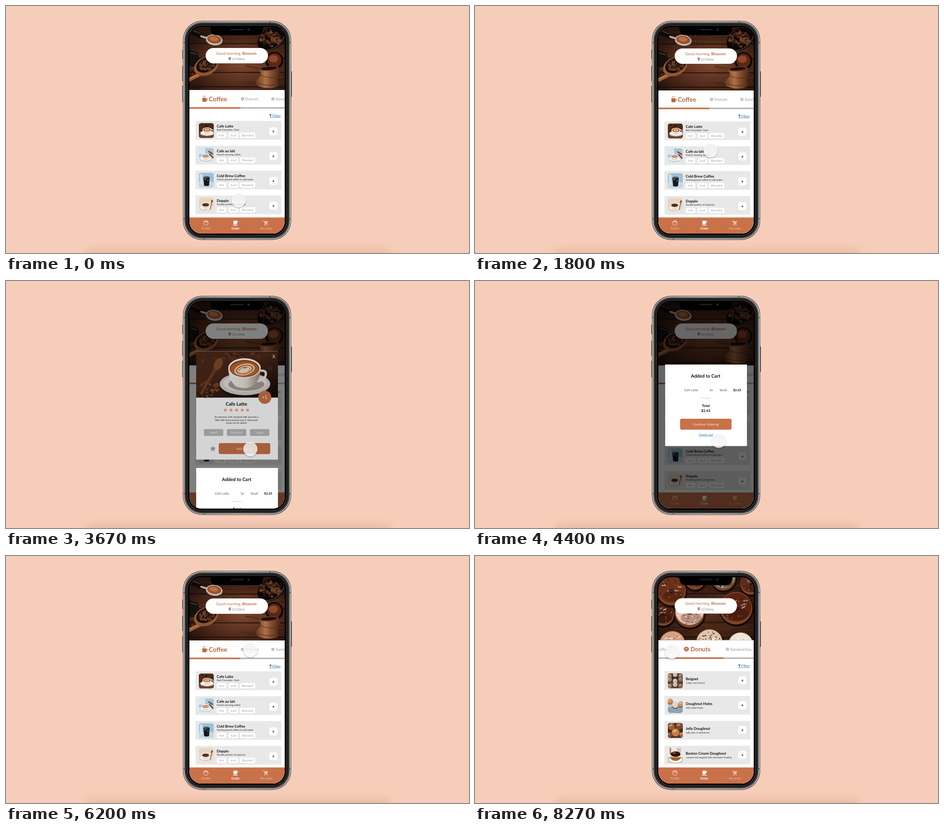
An HTML page for the animation above (8340 ms loop, 1025 px wide and 547 px high).

```html
<!DOCTYPE html>
<html lang="en">
<head>
<meta charset="utf-8">
<title>Coffee ordering app</title>
<style>
  html, body { margin: 0; width: 100%; height: 100%; overflow: hidden; background: #f6cdb8; }
  svg { display: block; width: 100vw; height: 100vh; }
  text { font-family: Lato, "Open Sans", sans-serif; text-rendering: geometricPrecision; }
</style>
</head>
<body>
<svg id="stage" viewBox="0 0 1025 547" xmlns="http://www.w3.org/2000/svg"></svg>
<script>
const LOOP = 8340;
const ORANGE = '#c97149', RUST = '#b9683f', BLUE = '#2b6ca3', GREY = '#b4b4b4';

// Drawing helpers
const rect = (x, y, w, h, fill, r = 0, more = '') =>
  `<rect x="${x}" y="${y}" width="${w}" height="${h}" rx="${r}" fill="${fill}" ${more}/>`;
const ell = (x, y, rx, ry, fill, rot = 0, more = '') =>
  `<ellipse rx="${rx}" ry="${ry}" fill="${fill}" transform="translate(${x} ${y}) rotate(${rot})" ${more}/>`;
const circ = (x, y, r, fill, more = '') => ell(x, y, r, r, fill, 0, more);
const path = (d, fill, more = '') => `<path d="${d}" fill="${fill}" ${more}/>`;
const line = (d, color, w, more = '') =>
  path(d, 'none', `stroke="${color}" stroke-width="${w}" stroke-linecap="round" stroke-linejoin="round" ${more}`);
const text = (x, y, s, size, fill, more = '') =>
  `<text x="${x}" y="${y}" font-size="${size}" fill="${fill}" ${more}>${s}</text>`;
const group = (id, body, more = '') => `<g ${id ? `id="${id}"` : ''} ${more}>${body}</g>`;
const repeat = (n, f) => Array.from({ length: n }, (_, i) => f(i)).join('');
const MID = 'text-anchor="middle"', BOLD = 'font-weight="700"', MIDBOLD = MID + ' ' + BOLD;

let seed = 7;
const rnd = () => (seed = seed * 16807 % 2147483647) / 2147483647;
const inDisc = (x, y, rx, ry, f) => {
  const a = rnd() * 6.283, d = Math.sqrt(rnd());
  return f(x + Math.cos(a) * d * rx, y + Math.sin(a) * d * ry);
};
const pick = list => list[Math.floor(rnd() * list.length)];

const beans = (n, x, y, rx, ry, size = 2.6) => repeat(n, () => inDisc(x, y, rx, ry, (bx, by) => {
  const a = rnd() * 180;
  return ell(bx, by, size, size * .68, pick(['#7a4429', '#54301f', '#925a38', '#341b11']), a)
    + ell(bx, by, size * .85, .4, '#170b06', a);
}));
const star = (x, y, r, fill) => path(repeat(10, i => {
  const a = i * Math.PI / 5 - Math.PI / 2, d = i % 2 ? r * .45 : r;
  return `${i ? 'L' : 'M'}${(x + d * Math.cos(a)).toFixed(2)} ${(y + d * Math.sin(a)).toFixed(2)}`;
}) + 'Z', fill);

const planks = glow => rect(406, 46, 211, 141, '#28140d') + rect(406, 46, 211, 141, 'url(#wood)', 0, `opacity="${glow}"`)
  + repeat(90, () => {
    const x = 400 + rnd() * 190, y = 47 + rnd() * 140;
    return line(`M${x} ${y}h${15 + rnd() * 50}`, pick(['#170a06', '#8f5236']), .7, 'opacity=".45"');
  })
  + repeat(4, i => line(`M406 ${84 + i * 32}H617`, '#140805', 1.6));

function coffeeHero() {
  return planks(1)
    + beans(22, 497, 60, 26, 9, 2.2) + beans(20, 420, 142, 14, 26, 2.4)
    // portafilter
    + line('M408 58L432 68', '#0f0b0a', 9) + line('M412 55L430 62', '#4c443f', 1.5) + line('M432 68L448 73', '#c9c0b9', 4)
    + ell(461, 79, 19, 12, '#3b2f29', 8) + ell(461, 76, 18.5, 12, '#cfc5bd', 8)
    + ell(461, 75, 15.5, 9, '#a9562b', 8) + ell(460, 73.5, 10, 5, '#c87c4d', 8)
    + path('M406 98L424 104L430 126L418 136L406 134Z', '#14100e') + line('M409 104L422 108', '#57493f', 1.5)
    // bean scoop
    + ell(588, 74, 34, 23, '#0d0806', -32) + beans(80, 587, 73, 25, 17, 3)
    + line('M560 94Q574 104 594 94Q614 82 616 66', '#3d322d', 2.5)
    // powder bowl
    + circ(594, 122, 20, '#0f0a08') + circ(594, 121, 15.5, '#5f2814') + ell(592, 118, 10, 8, '#93492a')
    // wooden scoop
    + line('M438 148L402 166', '#a9663c', 8) + line('M436 147L404 163', '#cf8b5a', 2)
    + ell(443, 134, 28, 20, '#9b5c35', -25) + ell(444, 131, 24, 16, '#170b06', -25)
    + beans(60, 444, 131, 19, 13, 2.7)
    // copper pot
    + line('M566 140L532 134', '#5b3320', 4)
    + path('M560 139Q580 130 604 137L607 150L600 160L604 178Q584 188 557 178L552 168L565 154Z', 'url(#copper)')
    + ell(582, 139, 22, 5.5, '#6d3c24', -4) + ell(582, 139, 18, 3.6, '#1f0e07', -4)
    + line('M565 155Q583 162 600 158M558 172Q580 180 602 174', '#5a2f1b', 1.2)
    + rect(406, 46, 211, 141, 'url(#shade)');
}

// Donut with glossy patches and toppings
function donut(x, y, r, glaze, dots, n, dough = '#7d4629') {
  return circ(x + 1, y + 3, r + 2, '#0a0402', 'opacity=".75"') + circ(x, y, r, dough)
    + ell(x, y - 2, r * .94, r * .88, glaze)
    + ell(x + r * .1, y + r * .35, r * .7, r * .38, '#1a0804', 0, 'opacity=".25"')
    + repeat(5, () => inDisc(x, y - r * .3, r * .65, r * .35, (a, b) =>
      ell(a, b, r * .16, r * .05, '#fff', -30 + rnd() * 40, 'opacity=".45"')))
    + repeat(n, () => inDisc(x, y, r * .84, r * .8, (a, b) => ell(a, b, 1.7, .9, pick(dots), rnd() * 180)))
    + ell(x, y, r * .2, r * .14, '#2a140c', 0, 'opacity=".8"');
}

function donutHero() {
  const choc = ['#8f4d2f', '#2c110a', '#b9764f'], red = ['#a83a26', '#c4573b', '#f6e2d8'];
  return planks(.45)
    + donut(416, 130, 25, '#4a2014', choc, 14) + donut(435, 78, 32, '#6b3019', choc, 20)
    + donut(487, 52, 23, '#7a3f25', ['#d9b08e', '#451c10'], 22)
    + donut(550, 50, 27, '#8f8365', ['#e7dfc9', '#5a5a3c', '#3b2015'], 60)
    + donut(611, 62, 24, '#5c2b1a', choc, 18)
    + donut(475, 126, 33, '#e9c3b2', red, 60) + donut(578, 116, 36, '#5a2412', choc, 28)
    + donut(519, 192, 30, '#dfc6b2', ['#7a452c', '#4c2717'], 55)
    + donut(588, 197, 28, '#efe4da', ['#b9895f', '#fff'], 22) + donut(437, 195, 29, '#d3a184', red, 22);
}

// Thumbnails, 33 units square
const cup = (x, y, r, drink) => ell(x, y + r * .75, r * 1.5, r * .62, '#c3c9cd') + ell(x, y + r * .65, r * 1.35, r * .5, '#f5f5f5')
  + circ(x + r, y + r * .2, r * .35, 'none', 'stroke="#eee" stroke-width="1.4"')
  + path(`M${x - r} ${y}Q${x - r * .8} ${y + r} ${x} ${y + r}Q${x + r * .8} ${y + r} ${x + r} ${y}Z`, '#dedbd8')
  + ell(x, y, r, r * .55, '#fff') + ell(x, y, r * .86, r * .43, drink);
const bg = (a, b) => rect(0, 0, 33, 33, a) + ell(16, 30, 24, 12, b);
const glass = (fill, top) => path('M10 10H24L22.5 28H11.5Z', fill) + ell(17, 10, 7, 2.2, top) + ell(17, 28, 5.5, 1.4, fill);
const blob = (x, y, r, c) => circ(x, y + 1.2, r + .4, '#2a150c', 'opacity=".7"') + circ(x, y, r, c)
  + ell(x - r * .2, y - r * .35, r * .55, r * .3, '#fff', -20, 'opacity=".35"');

const COFFEES = [
  ['Cafe Latte', 'Real Chocolate- Dark', () => bg('#4b2817', '#6e4128') + beans(14, 9, 6, 9, 6, 2)
    + cup(18, 15, 10, '#b5672f') + ell(18, 15, 4.5, 2.4, '#f0d2b0') + ell(18, 15, 2.4, 1, '#b5672f')],
  ['Cafe au lait', 'French morning coffee', () => bg('#a9c7d8', '#dfeaf0') + rect(0, 0, 14, 14, '#d9e8ef')
    + cup(15, 18, 9, '#c7987a') + line('M24 14L31 22M22 8L30 13', '#7a4630', 3)],
  ['Cold Brew Coffee', 'freshly ground coffee in cold water', () => bg('#9dc0d3', '#c3d9e4')
    + rect(2, 3, 6, 22, '#cfe2ec') + glass('#15171c', '#4a4f58') + circ(14, 14, 2, '#566') + circ(20, 17, 2, '#455')],
  ['Doppio', 'Double portion of espresso', () => bg('#e9d5bf', '#f0e2d2') + cup(15, 16, 9, '#5a2f1a')
    + line('M29 9L25 25', '#8a5636', 1.6) + ell(29, 8, 2, 3, '#8a5636', 15)],
  ['Freakshake', 'blended/mixed/stirred with toppings', () => bg('#eaf0f3', '#a5c3d5')
    + glass('#8d6a55', '#e9dfd6') + circ(15, 8, 4, '#f4eee9') + line('M19 9L23 1M12 14L21 20M13 22L20 16', '#3f2519', 1.4)],
  ['Affogato', 'Espresso poured on a vanilla ice cream', () => bg('#dfeaf0', '#98bdd2') + circ(14, 5, 6, '#1c1614')
    + line('M15 8Q18 14 16 20', '#2c1a12', 1.8) + cup(16, 21, 8, '#efe3d2') + circ(15, 20, 3, '#fff8ea')]
];
const DONUTS = [
  ['Beignet', 'fritter, but French', () => bg('#3b302c', '#57483f') + repeat(9, i =>
    blob(4 + i % 3 * 12, 6 + Math.floor(i / 3) * 11 - i % 2 * 3, 5.2, ['#a17a5c', '#c9b6a6', '#8f6a4e'][i % 3]))],
  ['Doughnut Holes', 'bite-sized treats', () => bg('#e3e9ec', '#9fb4be') + repeat(6, i => line(`M0 ${16 + i * 4}L33 ${22 + i * 4}`, '#506b78', .9))
    + blob(5, 7, 6, '#cf8a54') + blob(29, 13, 6, '#d6935d') + blob(16, 15, 7, '#e2cfbe')],
  ['Jelly Doughnut', 'jelly, jam, or preserves', () => bg('#3d261b', '#54382a') + blob(8, 8, 8, '#9a5a34')
    + blob(25, 7, 8, '#804727') + blob(17, 21, 9, '#c57a42') + blob(3, 27, 6, '#8a4f30') + blob(31, 26, 6, '#a3633c')],
  ['Boston Cream Doughnut', 'custard and topped with chocolate frosting', () => bg('#efe9e2', '#c9b9aa')
    + rect(4, 0, 3, 14, '#8f8074') + rect(20, 0, 9, 10, '#cfc2b5') + ell(17, 27, 15, 5, '#fff') + ell(17, 22, 11, 7, '#a3622f')
    + rect(7, 18, 20, 3, '#f3dca0', 1) + ell(17, 14, 11, 6, '#32140c') + ell(14, 11.5, 4, 1, '#a98a7c')]
];

const rowY = i => 255.5 + i * 55.05;
const plus = y => rect(583, y, 18, 17.7, '#fff', 5) + text(592, y + 12.3, '+', 9.5, '#111', MIDBOLD);
const chip = (x, w, y, s) => rect(x, y, w, 11.6, '#fff', 3) + text(x + w / 2, y + 8.2, s, 6.8, '#b9b9b9', MIDBOLD);

function row(y, [name, note, draw], chips) {
  const dy = chips ? 0 : 6;
  return group('', draw(), `transform="translate(427 ${y + 4.7})" clip-path="url(#thumb)"`)
    + text(466.6, y + 14 + dy, name, 8.1, '#111', BOLD)
    + text(chips ? 466.6 : 467.6, y + 21.8 + dy, note, 5.35, '#222')
    + (chips ? chip(466.6, 21, y + 26, 'Hot') + chip(493, 21, y + 26, 'Iced') + chip(517.8, 34, y + 26, 'Blended') : '')
    + plus(y + (chips ? 14 : 11.5));
}

const coffeeIcon = () => path('M-5-2H4V4Q4 6.5 1.5 6.5H-2.5Q-5 6.5-5 4Z', 'currentColor')
  + line('M4 0H5.5Q7 .2 6.8 2Q6.5 3.6 4 3.6M-2.5-4Q-3.5-5-2.3-6.4M.5-4Q-.5-5 .7-6.8', 'currentColor', 1.1);
const donutIcon = () => ell(0, 0, 5.9, 5.3, 'currentColor') + ell(0, -1, 2.7, 1, '#fff')
  + line('M-5.6 1.2Q-2.8 3.4 0 2.4Q2.8 3.4 5.6 1.2', '#fff', .5);
const breadIcon = () => path('M-5.5-1Q-5.5-4.5-2-4.5H2Q5.5-4.5 5.5-1Z', 'currentColor')
  + rect(-5.8, -.3, 11.6, 1.8, 'currentColor', .9) + rect(-5.5, 2.2, 11, 2.6, 'currentColor', 1.2);
const tab = (id, icon, s) => group(id, group('', icon(), 'transform="translate(-9.2 -.4)"')
  + text(0, 4.9, s, 13.7, 'currentColor', BOLD));

const heroClip = 'clip-path="url(#hero)"';
const page = () => group('coffeeHero', coffeeHero(), heroClip) + group('donutHero', donutHero(), heroClip)
  + rect(442, 94, 138, 34, '#fff', 17)
  + text(510, 108.8, 'Good morning, <tspan font-weight="700">Blossom</tspan>', 8.5, RUST, MID)
  + path('M495.4 121.6Q492.6 118.5 492.7 116.8A2.7 2.7 0 0 1 498.1 116.8Q498.2 118.5 495.4 121.6Z', '#777') + circ(495.4, 116.8, 1, '#fff')
  + text(500.6, 121, '5270846', 6.9, '#888')
  + rect(406, 187, 211, 320, '#fff')
  + tab('tab0', coffeeIcon, 'Coffee') + tab('tab1', donutIcon, 'Donuts') + tab('tab2', breadIcon, 'Sandwiches')
  + rect(406, 225, 211, 3.4, '#b9b6b6') + group('bar', rect(0, 225, 1, 3.4, ORANGE))
  + path('M582.6 240.8H588.4L586.3 243.6V247L584.7 246V243.6Z', BLUE)
  + text(589.8, 246.6, 'Filter', 8, BLUE) + rect(583, 247.6, 25.5, .7, BLUE)
  + repeat(6, i => rect(419.5, rowY(i), 190, 41.5, '#e8e8e8'))
  + group('coffeeList', COFFEES.map((c, i) => row(rowY(i), c, true)).join(''))
  + group('donutList', DONUTS.map((d, i) => row(rowY(i), d, false)).join(''));

function nav() {
  const pale = '#ecc4af';
  return rect(406, 468.3, 211, 37, ORANGE)
    + circ(442.5, 480.6, 5.2, 'none', `stroke="${pale}" stroke-width="1.1"`)
    + path('M437.6 480Q441 479.5 442 476.8Q444 480 447.4 480Q447 475.3 442.5 475.3Q438 475.3 437.6 480Z', pale)
    + circ(440.6, 482, .7, pale) + circ(444.4, 482, .7, pale)
    + path('M503.5 475.5H511V481.5Q511 483.8 508.8 483.8H505.7Q503.5 483.8 503.5 481.5Z', '#fff')
    + line('M511 476.6H512.8V479.6H511', '#fff', 1.1) + rect(502.5, 484.9, 10.5, 1.3, '#fff')
    + line('M568.8 475.8H570.8L573.3 481.6H578L579.6 477.2H571.4M573 481.7L572.2 483.3H578.6', pale, 1.1)
    + path('M571.5 477H579.5L578 481.5H573.3Z', pale) + circ(573, 485.3, 1.1, pale) + circ(578, 485.3, 1.1, pale)
    + text(442.8, 495.4, 'Profile', 6.9, pale, MID) + text(508, 495.4, 'Order', 7, '#fff', MIDBOLD)
    + text(576, 495.4, 'My order', 6.9, pale, MID);
}

const button = (x, y, s) => rect(x, y, 114, 24.3, ORANGE, 4) + text(x + 57, y + 14.8, s, 7, '#fbe9e0', MID);

function popup() {
  const photo = rect(421, 155.5, 181, 103, 'url(#table)')
    + repeat(24, () => circ(421 + rnd() * 181, 156 + rnd() * 40, 2 + rnd() * 4, '#a5683f', 'opacity=".14"'))
    + beans(45, 445, 240, 32, 20, 3) + beans(16, 505, 166, 24, 7, 2.4)
    + line('M468 190Q452 212 433 248', '#6e4026', 6) + ell(470, 184, 9, 14, '#80492b', 25)
    + ell(529, 233, 56, 25, '#1a0d08', 0, 'opacity=".7"') + ell(529, 228, 56, 25, '#d3ccc8')
    + ell(529, 226, 48, 19, '#e6e1de') + ell(532, 229, 40, 14, '#a59b95')
    + line('M560 199Q580 196 574 211Q569 222 552 222', '#e9e4e0', 5)
    + path('M492 194Q494 222 510 234Q528 241 546 233Q563 220 564 194Z', 'url(#china)')
    + ell(528, 193, 36, 22, '#fdfbf9') + ell(528, 194, 33, 19, '#93471a') + ell(528, 195, 31, 17, '#b9652b')
    // latte art
    + ell(528, 196, 23, 12.5, '#f1d9bf', -12) + ell(528, 196, 19.5, 10, '#b9652b', -12)
    + ell(528, 196, 16.5, 8, '#f1d9bf', -12) + ell(528, 196, 13, 5.5, '#b9652b', -12)
    + path('M516 200Q520 190 529 194Q538 188 540 193Q538 200 527 203Q519 204 516 200Z', '#f4e0c9');
  const size = (x, s) => rect(x, 328, 43, 15, '#bababa', 2) + text(x + 21.5, 337.8, s, 7, '#ededed', MIDBOLD);
  return rect(421, 155.5, 181, 240, '#fff') + group('', photo, 'clip-path="url(#photo)"')
    + text(593, 171, 'X', 10.5, '#fff', MID)
    + circ(573, 257.6, 14.5, ORANGE) + text(572.5, 261.3, '+1', 10.3, '#fff', MID)
    + text(510, 276.3, 'Cafe Latte', 10.5, '#111', MIDBOLD)
    + repeat(5, i => star(485.6 + i * 12.4, 286, 4.6, '#eda573'))
    + ['An espresso with steamed milk and only a', 'little milk foam poured over it. Flavoured', 'syrup can be added.']
      .map((s, i) => text(510.3, 303 + i * 6.7, s, 5.35, '#222', MID)).join('')
    + size(438, 'Small') + size(489, 'Medium') + size(540, 'Large')
    + star(458, 371.5, 7, '#a5a5a5') + button(471, 359, 'Add to Cart');
}

const card = () => rect(421, 0, 181, 180.5, '#fff')
  + text(510.6, 29.3, 'Added to Cart', 10.4, '#111', MIDBOLD)
  + text(462.7, 59.4, 'Cafe Latte', 7, '#555') + text(519, 59.4, '1x', 7, '#444')
  + text(541.4, 59.4, 'Small', 7, '#555') + text(571.4, 59.4, '$2.65', 7, '#111', BOLD)
  + rect(500, 74, 22, .8, '#bbb')
  + text(511, 94.3, 'Total', 8, '#111', MIDBOLD) + text(511, 105.4, '$2.65', 8, '#111', MIDBOLD)
  + button(454, 120, 'Continue Ordering')
  + text(511, 157.5, 'Check out', 7, BLUE, MID) + rect(495.5, 158.6, 31, .6, BLUE);

// Rounded outline of the phone, shrunk by d
const shell = (d, fill) => rect(391.8 + d, 33 + d, 239.4 - 2 * d, 485 - 2 * d, fill, 42 - d);
const phoneBody = () => [[390, 97, 20], [390, 133, 33], [390, 177, 36], [630, 145, 56]]
    .map(([x, y, h]) => rect(x, y, 3, h, '#4b4a4a', 1) + rect(x + .7, y + 1, 1, h - 2, '#b5b1af')).join('')
  + shell(0, '#2c2a2a') + shell(1.1, 'url(#steel)') + shell(3.2, '#2b2a2a')
  + shell(4.4, '#6b6868') + shell(5.6, '#1c1b1b') + shell(9.4, '#4a4848') + shell(10.4, '#000')
  + [[392, 80], [392, 470], [628, 80], [628, 470]].map(([x, y]) => rect(x, y, 3, 2.2, '#676362')).join('')
  + rect(583, 33.4, 2.4, 3, '#676362') + rect(438, 514.6, 2.4, 3, '#676362');
const notch = () => path('M449 46Q453 47 453 51Q453.5 64.5 466 64.5H556Q568.5 64.5 569 51Q569 47 573 46Z', '#000')
  + rect(497, 50.4, 29, 3.6, '#1d1c1c', 1.8) + circ(537, 52.2, 3, '#16181d') + circ(537, 52.2, 1.3, '#2b3245');

const grad = (id, stops, more = '', kind = 'linear') => `<${kind}Gradient id="${id}" ${more}>`
  + stops.map(([o, c, a = 1]) => `<stop offset="${o}" stop-color="${c}" stop-opacity="${a}"/>`).join('') + `</${kind}Gradient>`;
const clip = (id, shape) => `<clipPath id="${id}">${shape}</clipPath>`;
const defs = '<defs>'
  + grad('wood', [[0, '#834a30'], [.55, '#5a301e'], [1, '#2d170f']], 'cx=".55" cy=".6" r=".62"', 'radial')
  + grad('shade', [[0, '#000', .18], [.4, '#000', 0], [1, '#000', .12]], 'x2="0" y2="1"')
  + grad('copper', [[0, '#6b3b22'], [.4, '#c07c4e'], [.65, '#8d5331'], [1, '#4f2817']])
  + grad('table', [[0, '#4a2918'], [.45, '#4a2818'], [1, '#160b07']], 'x2=".8" y2="1"')
  + grad('china', [[0, '#f8f4f1'], [.55, '#e6dfda'], [1, '#94867d']])
  + grad('steel', [[0, '#e2dfde'], [.03, '#b7b3b2'], [.5, '#d8d5d4'], [.97, '#b7b3b2'], [1, '#e2dfde']])
  + grad('touch', [[0, '#f0f0f0'], [1, '#fafafa']], 'x2="0" y2="1"')
  + clip('hero', rect(406, 46, 211, 141, '#000')) + clip('screen', rect(406, 47.2, 211, 456.8, '#000', 27))
  + clip('photo', rect(421, 155.5, 181, 103, '#000')) + clip('thumb', rect(0, 0, 33, 33, '#000', 5))
  + '<filter id="blur" x="-10%" y="-100%" width="120%" height="300%"><feGaussianBlur stdDeviation="8"/></filter>'
  + '<filter id="drop" x="-30%" y="-30%" width="160%" height="170%"><feDropShadow dx="0" dy="1.6" stdDeviation="1.4" flood-opacity=".35"/></filter>'
  + '</defs>';

const stage = document.getElementById('stage');
const dim = id => rect(400, 40, 225, 470, '#000', 0, `id="${id}"`);
stage.innerHTML = defs + rect(0, 0, 1025, 547, '#f6cdb8')
  + rect(176, 537, 676, 40, '#e3b39c', 14, 'filter="url(#blur)" opacity=".6"')
  + phoneBody()
  + group('', rect(406, 47, 211, 458, '#fff') + group('page', page()) + nav()
    + dim('dim1') + group('popup', popup()) + dim('dim2') + group('card', card()), 'clip-path="url(#screen)"')
  + notch()
  + group('cursor', circ(0, 0, 15.4, 'url(#touch)', 'stroke="#fff" stroke-opacity=".8" stroke-width=".8"'), 'filter="url(#drop)" opacity=".8"');

// Motion
const el = {};
stage.querySelectorAll('[id]').forEach(n => el[n.id] = n);
const mix = (a, b, p) => a + (b - a) * p;
const part = (t, a, b) => Math.min(1, Math.max(0, (t - a) / (b - a)));
const smooth = p => p * p * (3 - 2 * p);

// cubic-bezier(0, 0, .58, 1)
function easeOut(p) {
  let lo = 0, hi = 1;
  for (let i = 0; i < 18; i++) {
    const s = (lo + hi) / 2;
    if (1.74 * (1 - s) * s * s + s ** 3 < p) lo = s; else hi = s;
  }
  return smooth(lo);
}

// start, end, bend point, destination, easing
const MOVES = [
  [1540, 2130, 501, 256, 592, 278, smooth],
  [2980, 3520, 582, 345, 541, 372, smooth],
  [4150, 4800, 540, 345, 533, 316, smooth],
  [5450, 6200, 541, 262, 541, 208, easeOut],
  [7250, 8290, 490, 222, 436, 212, smooth]
];
function cursorAt(t) {
  let x = 515, y = 430;
  for (const [a, b, cx, cy, ex, ey, ease] of MOVES) {
    if (t < a) break;
    const p = ease(part(t, a, b));
    x = mix(mix(x, cx, p), mix(cx, ex, p), p);
    y = mix(mix(y, cy, p), mix(cy, ey, p), p);
  }
  return [x, y];
}

const hex = c => [1, 3, 5].map(i => parseInt(c.slice(i, i + 2), 16));
const blend = (a, b, p) => `rgb(${hex(a).map((v, i) => Math.round(mix(v, hex(b)[i], p)))})`;
const move = (n, x, y, s = 1) => n.setAttribute('transform', `translate(${x} ${y}) scale(${s})`);
const fade = (n, v) => {
  n.setAttribute('opacity', v);
  n.style.display = v > 0 ? '' : 'none';
};
function setTab(n, x, size, on) {
  move(n, x, 207, size / 13.7);
  n.style.color = blend(GREY, RUST, on);
}

function render(t) {
  const scroll = t < 600 ? mix(1, 119, smooth(part(t, 40, 400))) : mix(119, 0, smooth(part(t, 790, 1270)));
  const swap = easeOut(part(t, 6570, 7230));
  move(el.page, 0, -scroll - swap * .5);
  fade(el.donutHero, swap);
  fade(el.donutList, swap);
  fade(el.coffeeList, 1 - swap);
  setTab(el.tab0, mix(449, 401, swap), mix(13.8, 9, swap), 1 - swap);
  setTab(el.tab1, mix(529.8, 477, swap), mix(8.9, 13.5, swap), swap);
  setTab(el.tab2, mix(597, 565, swap), 9, 0);
  el.bar.setAttribute('transform', `translate(${mix(406, 443, swap)} 0) scale(${mix(112.5, 107, swap)} 1)`);

  const cardIn = easeOut(part(t, 3562, 4162)) - easeOut(part(t, 5106, 5706));
  const popIn = t < 4162 ? easeOut(part(t, 2380, 2980)) : 0;
  fade(el.dim1, popIn * .4);
  fade(el.popup, popIn > 0 ? 1 : 0);
  move(el.popup, 0, (1 - popIn) * 349);
  fade(el.dim2, cardIn * .6);
  fade(el.card, cardIn > 0 ? 1 : 0);
  move(el.card, 0, mix(504, 185, cardIn));

  move(el.cursor, ...cursorAt(t));
}

const start = performance.now();
function tick() {
  render((performance.now() - start) % LOOP);
  requestAnimationFrame(tick);
}
tick();
</script>
</body>
</html>
```
